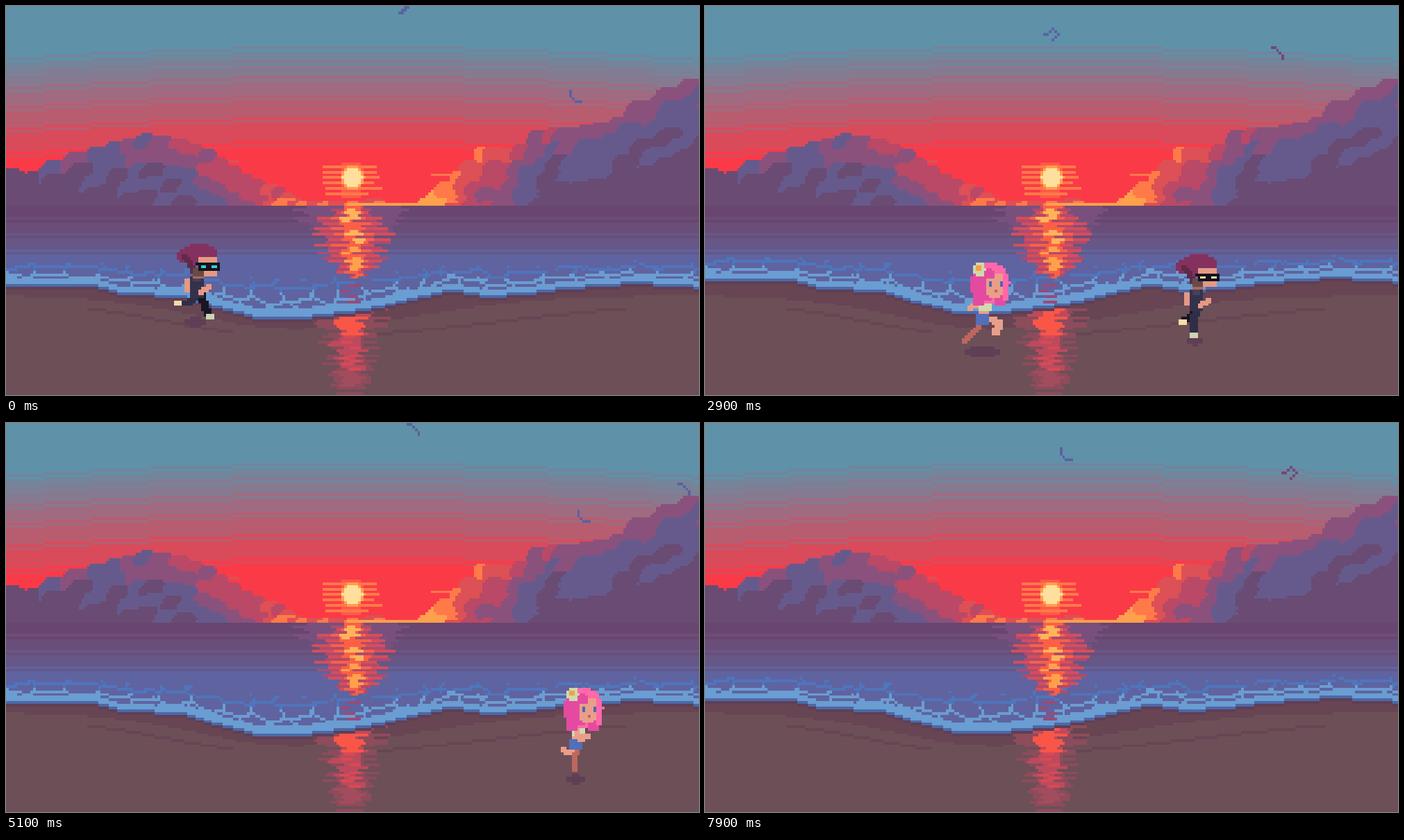
Animation, 998 px wide and 561 px high, one loop 8 s. Source, as an HTML page with a canvas:

```html
<!DOCTYPE html>
<html lang="en">
<head>
<meta charset="utf-8">
<title>Sunset run</title>
<style>
html, body { margin: 0; width: 100%; height: 100%; overflow: hidden; background: #6d4f58; }
canvas { display: block; width: 100vw; height: 100vh; image-rendering: pixelated; }
</style>
</head>
<body>
<canvas id="stage" width="256" height="144"></canvas>
<script>
const W = 256, H = 144, U = 998 / 256, HORIZON = 74, SUN = 499;
const stage = document.getElementById('stage').getContext('2d');
let g = stage, ox = 0, oy = 0;

function box(x, y, w, h, c) {
  g.fillStyle = c;
  g.fillRect(Math.round(x + ox), Math.round(y + oy), w, h);
}

// A filled ellipse made of whole pixels.
function blob(x, y, rx, ry, c, floor = H) {
  for (let j = Math.ceil(y - ry); j < y + ry && j < floor; j++) {
    const half = rx * Math.sqrt(Math.max(0, 1 - ((j + .5 - y) / ry) ** 2));
    const left = Math.round(x - half);
    box(left, j, Math.round(x + half) - left, 1, c);
  }
}

function path(pts, w, h, c) {
  for (let k = 1; k < pts.length; k++) {
    const [x0, y0] = pts[k - 1], [x1, y1] = pts[k];
    const n = Math.max(Math.abs(x1 - x0), Math.abs(y1 - y0), 1);
    for (let i = 0; i <= n; i++) {
      box(x0 + (x1 - x0) * i / n, y0 + (y1 - y0) * i / n, w, h, c);
    }
  }
}

function along(pts, x) {
  let i = 1;
  while (i < pts.length - 1 && x > pts[i][0]) i++;
  const [x0, y0] = pts[i - 1], [x1, y1] = pts[i];
  return y0 + (y1 - y0) * (x - x0) / (x1 - x0);
}

function rnd(a, b = 0) {
  const s = Math.sin(a * 127.1 + b * 311.7) * 43758.5453;
  return s - Math.floor(s);
}

const clamp = (v, lo, hi) => Math.min(hi, Math.max(lo, v));

function layer(paint) {
  const c = document.createElement('canvas');
  c.width = W;
  c.height = H;
  g = c.getContext('2d');
  paint();
  g = stage;
  return c;
}

const GOLD = '#ffa04d', ORANGE = '#ff7a48', CORAL = '#dd5055', CREAM = '#ffdf9e';
const tints = [GOLD, ORANGE, CORAL, '#b94966', '#8a517d', '#665a8c', '#6a4b74'];

const skyTints = ['#5f91a9', '#74849a', '#867a90', '#a06b80', '#b85d70', '#d94b5a', '#fb3a48'];
const bandStart = i => i < 1 ? 0 : 17 + (i - 1) * (i + 8) / 2;

// Slightly arched bands, each announced by one line of the next colour.
function skyColor(x, y) {
  const v = y - Math.round(4.5 * ((x - 126) / 128) ** 2);
  let i = 0;
  while (i < 6 && v >= bandStart(i + 1)) i++;
  return skyTints[i < 6 && bandStart(i + 1) - v === 2 ? i + 1 : i];
}

const sky = layer(() => {
  for (let y = 0; y < HORIZON; y++) {
    for (let x = 0; x < W; x++) box(x, y, 1, 1, skyColor(x, y));
  }
  for (let y = 58; y < 71; y++) {
    const reach = 4 + (y % 2) * (3 + rnd(y, 1) * 5);
    box(128 - reach, y, Math.round(reach * (1.6 + .5 * rnd(y, 2))), 1, y % 2 ? ORANGE : '#ff5a48');
  }
  blob(128, 63.5, 4.5, 4.5, GOLD);
  blob(128, 63.5, 3.6, 4, CREAM);
  box(79, 57, 7, 1, CORAL);
  box(157, 62, 14, 1, ORANGE);
});

const leftRidge = [[0, 232], [40, 238], [90, 211], [150, 195], [200, 183], [250, 188],
  [290, 206], [340, 238], [400, 264], [440, 288]];
const rightRidge = [[590, 288], [640, 246], [690, 199], [735, 207], [765, 177], [845, 169],
  [885, 160], [925, 128], [985, 105], [1030, 105]];

// Puffs hang in tiers below a ridge; they get darker downwards and away from the sun.
function cloud(ridge, seed, tone) {
  const last = ridge[ridge.length - 1][0];
  for (let tier = 0; tier < 8; tier++) {
    for (let x = ridge[0][0] + rnd(tier, seed) * 12, k = 0; x < last; k++) {
      const away = Math.abs(x - SUN), key = k + tier * 31;
      const r = (8 + away * .045) * (.8 + .4 * rnd(key, seed));
      const y = along(ridge, x) + r + tier * 20;
      const hue = tone(away, tier) + (rnd(key, seed + 1) - .5) * 1.5;
      if (y - r < 286) blob(x / U, y / U, r / U, r / U, tints[clamp(Math.round(hue), 0, 6)], HORIZON);
      x += r * 1.15;
    }
  }
}

const sand = '#6d4f58', wet = '#674553', edge = '#5f3f55';
const shore = [[0, 402], [125, 402], [165, 413], [255, 417], [290, 430], [365, 449], [420, 449],
  [520, 436], [640, 408], [690, 417], [740, 414], [800, 406], [905, 398], [998, 404]];
const shoreRow = x => Math.round(along(shore, x * U) / U);
const dip = (x, left, right) => Math.exp(-(((x - 415) / (x < 415 ? left : right)) ** 2));

const seaTints = ['#69466f', '#6a4e79', '#665786', '#5f63a0'];
function seaColor(d) {
  const i = Math.floor(d / 6) + (d % 6 === 4 ? 1 : 0);
  return seaTints[Math.min(i, 3)];
}

const land = layer(() => {
  cloud(leftRidge, 5, (away, tier) => 2 + (away - 90) / 105 + tier * .55);
  cloud(rightRidge, 11, (away, tier) => Math.min(4, (away - 110) / 45) + tier * .5);
  for (let x = 395; x < 545; x += 9) {
    const r = 1 + 2 * rnd(x);
    blob(x / U, HORIZON - .5, r * 1.8, r, tints[1 + Math.round(rnd(x, 1))], HORIZON);
  }
  box(126, 73, 28, 1, GOLD);
  for (let y = HORIZON; y < 105; y++) box(0, y, W, 1, seaColor(y - HORIZON));
  for (let x = 0; x < W; x++) {
    const top = shoreRow(x) - 4, px = x * U;
    box(x, top, 1, H - top, sand);
    box(x, top, 1, Math.max(6, Math.round((418 + 48 * dip(px, 200, 250)) / U) - top), wet);
    if (px > 115 && px < 890 && rnd(Math.floor(x / 21), 3) > .15) {
      box(x, (422 + 54 * dip(px, 250, 400)) / U, 1, 1, wet);
    }
  }
  for (let y = 112; y < H; y++) {
    const k = (y - 112) / 32, r = rnd(y, 4), shift = (rnd(y, 2) - .5) * 4;
    const span = (half, c) => box(127 - half + shift, y, Math.round(half * 2), 1, c);
    if (y % 2 || r > .4) span(5 + 11 * (1 - k) * r, '#8d4b5b');
    if (k < .75 || r > .5) span(3 + 6 * (1 - k) * rnd(y, 6), k < .7 ? '#bd4a5c' : '#a34c5d');
    if (k < .3) span(2 + 4 * r, '#fa5648');
    else if (k < .7 && r > .4) span(2, '#d94955');
  }
});

// Number of the nearest point in a jittered grid.
function cell(u, v) {
  let best = 9, id = 0;
  for (let i = Math.floor(u) - 1; i <= u + 1; i++) {
    for (let j = Math.floor(v) - 1; j <= v + 1; j++) {
      const d = Math.hypot(i + .15 + .7 * rnd(i, j) - u, j + .15 + .7 * rnd(j, i + 50) - v);
      if (d < best) { best = d; id = i * 40 + j; }
    }
  }
  return id;
}

const waves = layer(() => {
  const light = '#6a9dd2', mid = '#4f75bc';
  for (let x = 0; x < W; x++) {
    const end = shoreRow(x), deep = 7 + (end * U - 397) / 7.4, step = 2.5 / deep;
    box(x, 97, 1, end - 97, '#5f63a0');
    for (let d = 0; d < deep; d++) {
      const u = x / 11, v = d * step, here = cell(u, v);
      const rim = here !== cell(u, v + step) || here !== cell(u + 1 / 11, v);
      if (d < deep / 5) box(x, end - 1 - d, 1, 1, light);
      else if (rim && (v < 2 || rnd(Math.floor(x / 6), d) > .3)) {
        box(x, end - 1 - d, 1, 1, v < 1.5 ? light : mid);
      }
    }
    box(x, end, 1, 1, '#4d68a8');
    box(x, end + 1, 1, 1, edge);
  }
});

function glitter(t) {
  const phase = Math.PI * 2 * t / 2.6;
  for (let i = 0; i < 27; i++) {
    const p = i / 26, swell = Math.sin(Math.PI * p), r = rnd(i, 7);
    const sway = Math.sin(phase + i * 2.1), shift = (rnd(i, 3) - .5) * 4 + sway * .7;
    const span = (half, c) => box(128 - half + shift, HORIZON + i, Math.round(half * 2), 1, c);
    if (i < 11) span((24 - i * .8) * (.65 + .3 * r) + sway, '#79507d');
    span((6 - 3 * p + 12 * swell) * (.5 + .5 * r) + sway, i % 2 ? '#b14a6b' : '#d44e5d');
    span((5 - 3 * p + 5 * swell) * (i % 2 ? .45 : .9) * (.6 + .4 * r) + sway * .6, '#fb6045');
    if (p < .9 && rnd(i, 12) > .35) span(i % 2 ? 1.5 : 1.5 + 2.5 * r, i < 15 ? '#ffb45c' : GOLD);
  }
  for (let y = 103; y < 110; y += 2) {
    box(123 + Math.sin(phase + y) + rnd(y) * 3, y, 4 + Math.round(rnd(y, 5) * 4), 1, '#9a4a78');
  }
}

const wings = {
  hook: [[-2, -2], [-2, 0], [0, 2], [2, 2]],
  kite: [[-3, 0], [-2, 0], [0, -2], [2, 0], [0, 2]],
  fall: [[-2, -2], [-1, -2], [2, 1], [2, 2]],
  rise: [[-2, 1], [1, -2], [1, -1], [-1, 1], [-2, 1]]
};
const flaps = ['hook', 'kite', 'kite', 'fall', 'fall', 'rise', 'hook'];

function bird(x, y, beat, c = '#5a62a0') {
  ox = Math.round(x / U - .5);
  oy = Math.round(y / U - .5);
  path(wings[flaps[(beat + 7) % 7]], 1, 1, c);
  ox = oy = 0;
}

function birds(n) {
  const loop = n % 52, lead = loop > 46 ? loop - 52 : loop, s = lead / 10;
  bird(822 - 111 * s, 126 - 30 * s - 5.5 * Math.cos((s - 1.6) * 1.6), lead);
  const tail = loop < 3 ? loop + 52 : loop;
  if (tail > 20) {
    bird(823 - 10.8 * (tail - 29), 68 - 2.7 * (tail - 29), tail + 2, tail < 35 ? '#70497a' : undefined);
  }
  if (n > 9 && n < 27) bird(720 - 11 * (n - 19), 18 - 3 * (n - 19), n + 3);
  if (n > 50 && n < 78) bird(878 - 11 * (n - 60), 63 - 3.6 * (n - 60), n + 1);
}

function shadow(x, y, w) {
  box(x - w / 2, y - 1, w, 2, edge);
  box(x - w / 2 + 2, y - 2, w - 4, 4, edge);
}

function leg(hip, knee, foot, w, c, shoe) {
  path([hip, knee, foot], w, 2, c);
  if (shoe) box(foot[0], foot[1], 3, 2, shoe);
}

function man(n) {
  const t = n / 10, pose = n % 4, swap = n % 8 > 3;
  const skin = '#e59985', shade = '#b2645c', shirt = '#34324b', frame = '#17131c';
  const pale = '#cdd3b3', warm = '#f4dda5';
  const near = swap ? '#302e47' : '#191624', far = swap ? '#191624' : '#302e47';
  const x = Math.floor(63 + 27.5 * t + 3.77 * t * t);
  shadow(x + 7, 117.3 + 2.2 * t, pose === 1 ? 6 : 8);
  ox = x;
  oy = Math.round(89.2 + .6 * t + .13 * t * t - pose % 2 * (pose - 1) - (pose === 0 ? 1 : 0));
  if (pose === 0) {
    leg([6, 18], [3, 21], [-1, 21], 3, far, warm);
    leg([8, 18], [9, 23], [11, 26], 3, near, pale);
  } else if (pose === 1) {
    leg([6, 19], [4, 22], [1, 24], 3, far, warm);
    leg([6, 19], [5, 24], [5, 29], 3, near, pale);
  } else if (pose === 2) {
    leg([7, 19], [6, 23], [3, 27], 3, far, pale);
    leg([8, 19], [10, 22], [9, 26], 3, near, warm);
  } else {
    leg([6, 20], [4, 24], [0, 28], 2, far, pale);
    leg([7, 20], [9, 23], [9, 26], 3, near, warm);
  }
  const low = pose ? 1 : 0, air = pose === 3;
  box(air ? 1 : 3, 13 + low, 2, 5, skin);
  box(5, 12 + low, 5, 8, shirt);
  box(6, 12 + low, 3, 2, '#41425e');
  path(air ? [[10, 19], [10, 17]] : [[8, 17 + low], [11, 15 + low]], 2, 2, air ? shade : skin);
  box(6, 11, 4, 2, shade);
  blob(8.5, 4, 6.5, 4, '#843160');
  blob(3.5, 4.5, 3.5, 3, '#843160');
  path([[2, 4], [4, 6], [5, 9]], 2, 2, '#612949');
  box(8, 5, 7, 7, skin);
  box(6, 9, 4, 3, '#684a47');
  box(7, 7, 9, 1, frame);
  for (const glass of [8, 12]) {
    box(glass, 7, 4, 3, frame);
    box(glass + 1, 8, 2, 1, n < 4 ? '#22d4e2' : '#ffe5ac');
  }
  ox = oy = 0;
}

function girl(n) {
  const t = n / 10, u = t - .8, pose = n % 4, swap = n % 8 > 3, lit = n < 12;
  const skin = '#e99e8a', shade = '#bd675f', hair = '#e44aa0', shine = '#ff68a9';
  const top = lit ? '#fff3dc' : '#cfd9ad', denim = lit ? '#3d79e6' : '#526fb9';
  const near = swap ? skin : shade, far = swap ? shade : skin, air = pose === 1;
  const x = Math.round(10 + u * (35.1 + 4.15 * u - .395 * u * u));
  shadow(x + 4, 123.5 + 1.6 * t, air ? 13 : 7);
  ox = x;
  oy = Math.round(91.3 + 1.7 * t - .08 * t * t - (air ? .7 : 0));
  if (air) {
    leg([3, 21], [1, 24], [-3, 28], 2, far);
    leg([6, 20], [9, 21], [8, 25], 3, near);
  } else if (pose === 2) {
    leg([3, 22], [2, 24], [0, 27], 2, far);
    leg([6, 21], [7, 25], [7, 29], 2, near);
  } else {
    leg([4, 22], [0, 23], [-1, 22], 2, far);
    leg([4, 22], [3, 25], [3, 29], 2, near);
    if (lit) box(2, 29, 5, 4, '#2b2628');
  }
  box(3, 13, 5, 5, top);
  box(3, 18, 4, 2, skin);
  box(2, 19, 5, 4, denim);
  path(air ? [[2, 14], [-1, 16]] : [[4, 15], [5, 18], [8, 17]], 2, 2, skin);
  blob(7.5, 7.5, 7, 7.5, shine);
  blob(5, 8, 5, 6.5, hair);
  box(1, 12, 4, 4, hair);
  box(9, 11, 4, 5, hair);
  box(12, 6, 2, 8, shine);
  box(6, 6, 6, 6, skin);
  box(7, 12, 4, 1, skin);
  box(9, 4, 3, 2, skin);
  box(7, 7, 1, 2, '#5267b2');
  box(11, 7, 1, 2, '#5267b2');
  box(9, 10, 1, 1, '#c9606b');
  blob(3, 2.5, 2.5, 2.5, top);
  box(2, 1, 2, 2, '#f4a047');
  ox = oy = 0;
}

function draw(now) {
  const n = Math.floor(now % 8000 / 100), t = n / 10;
  const tide = 103.4 + 1.6 * Math.cos(Math.PI * 2 * (t - 2) / 2.6);
  stage.drawImage(sky, 0, 0);
  birds(n);
  stage.drawImage(land, 0, 0);
  stage.drawImage(waves, 0, Math.round(tide) - 104);
  glitter(t);
  man(n);
  girl(n);
}

const start = performance.now();
function tick() {
  draw(performance.now() - start);
  requestAnimationFrame(tick);
}
tick();
</script>
</body>
</html>
```
